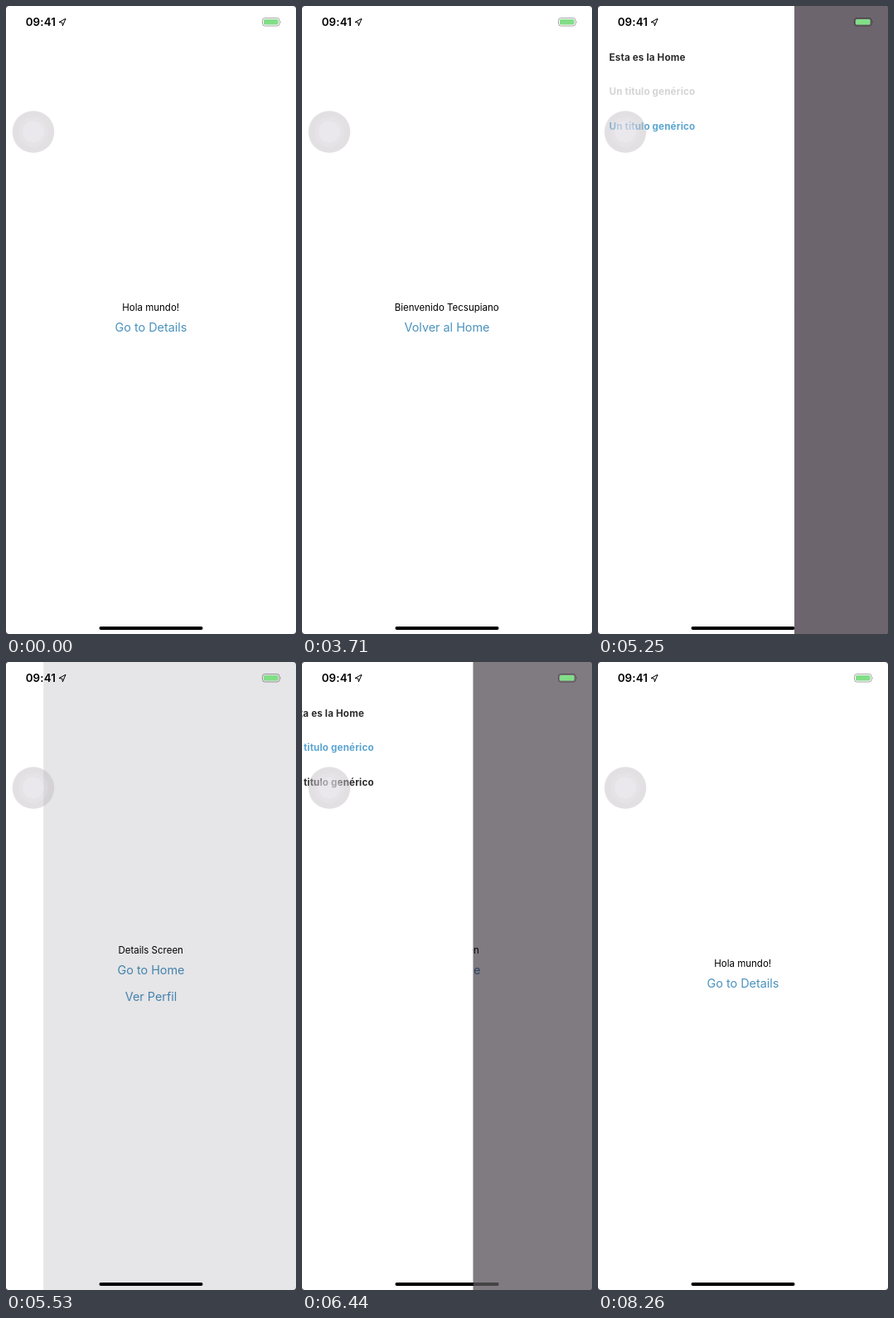
Animation of 350 by 756 pixels, one loop 8.33 s. Source, as an HTML page:

```html
<!DOCTYPE html>
<html lang="es">
<head>
<meta charset="utf-8">
<title>Drawer navigation</title>
<style>
  html, body { margin: 0; width: 100%; height: 100%; overflow: hidden; background: #444; }
  svg { display: block; width: 350px; height: 756px; background: #fff; border-radius: 4px; }
  text { font-family: Inter, "Liberation Sans", sans-serif; }
  .screen text { text-anchor: middle; font-size: 11.5px; }
  .screen .link { font-size: 14.4px; fill: #4a92be; }
  #drawer text { font-size: 11.6px; font-weight: 700; letter-spacing: .18px; }
  .clock { font-size: 13.3px; font-weight: 600; letter-spacing: .15px; }
</style>
</head>
<body>
<svg viewBox="0 0 350 756">
  <g class="screen">
    <text x="174.7" y="367">Hola mundo!</text>
    <text class="link" x="175" y="391.6">Go to Details</text>
  </g>
  <g class="screen">
    <text x="174.7" y="351">Details Screen</text>
    <text class="link" x="175" y="375.6">Go to Home</text>
    <text class="link" x="175" y="407.6">Ver Perfil</text>
  </g>
  <g class="screen">
    <text x="174.7" y="367">Bienvenido Tecsupiano</text>
    <text class="link" x="175" y="391.6">Volver al Home</text>
  </g>

  <rect id="shade" width="350" height="756" fill="#120714"/>
  <g id="drawer">
    <rect width="237" height="756" fill="#fff"/>
    <text x="13.5" y="66">Esta es la Home</text>
    <text x="13.5" y="107.3">Un titulo genérico</text>
    <text x="13.5" y="148.7">Un titulo genérico</text>
  </g>

  <g id="floating-button">
    <circle cx="33" cy="151.5" r="25.3" fill="#bebac1" opacity=".45"/>
    <circle cx="33" cy="151.5" r="18" fill="#f4f0f8" opacity=".15"/>
    <circle cx="33" cy="151.5" r="13" fill="#f4f0f8" opacity=".3"/>
  </g>

  <text class="clock" x="23.7" y="24.2">09:41</text>
  <path d="M64 19.5 72 15.2 68.4 23.8 67.8 20Z" fill="none" stroke="#000" stroke-linejoin="round"/>
  <rect x="309.5" y="14.5" width="20.5" height="9.5" rx="2.8" fill="none" stroke="#000" stroke-opacity=".35"/>
  <rect x="311" y="16" width="17.5" height="6.5" rx="1.5" fill="#82de87"/>
  <path d="M331.2 17.7q1.4 1.6 0 3.2z" fill="#000" opacity=".4"/>
  <rect x="112.5" y="747" width="125" height="4" rx="2"/>
  <rect id="indicator-glow" y="747" height="4" rx="2" fill="#fff"/>
</svg>
<script>
const LOOP = 8330, DRAWER_WIDTH = 237, SPRING_RATE = 0.016, FADED = 0.2;
const INDICATOR_LEFT = 112.5, INDICATOR_RIGHT = 237.5;
const HOME = 0, DETAILS = 1, PROFILE = 2;

const routes = [[0, HOME], [1400, DETAILS], [2660, PROFILE], [5340, DETAILS], [7188, HOME]];
const drawerMoves = [[3980, 1], [5340, 0], [6218, 1], [7188, 0]];

const screens = [...document.querySelectorAll('.screen')];
const drawer = document.getElementById('drawer');
const shade = document.getElementById('shade');
const glow = document.getElementById('indicator-glow');
const items = [...drawer.querySelectorAll('text')];

const presses = [
  { el: screens[HOME].querySelector('.link'), down: 1250, up: 1400 },
  { el: screens[DETAILS].querySelectorAll('.link')[1], down: 2510, up: 2660 },
  { el: items[DETAILS], down: 5240, up: 5340 },
  { el: items[HOME], down: 7060, up: 7188 },
];

const latest = (events, t) => events.filter(([start]) => start <= t).pop();

// Critically damped spring from 0 to 1
const spring = ms => {
  const x = ms * SPRING_RATE;
  return 1 - (1 + x) * Math.exp(-x);
};

function drawerProgress(t) {
  const move = latest(drawerMoves, t);
  if (!move) return 0;
  const [start, target] = move, p = spring(t - start);
  const value = target ? p : 1 - p;
  return value < 0.004 ? 0 : value > 0.997 ? 1 : value;
}

function pressOpacity(t, { down, up }) {
  if (t < down) return 1;
  return t < up ? FADED : Math.min(1, FADED + (1 - FADED) * (t - up) / 250);
}

function render(t) {
  const route = latest(routes, t)[1], open = drawerProgress(t);
  const edge = open * DRAWER_WIDTH;
  screens.forEach((screen, i) => screen.style.display = i === route ? '' : 'none');
  items.forEach((item, i) => item.setAttribute('fill', i === route ? '#5ca5d0' : '#2c2c2e'));
  presses.forEach(press => press.el.setAttribute('opacity', pressOpacity(t, press)));
  drawer.setAttribute('transform', `translate(${edge - DRAWER_WIDTH})`);
  shade.setAttribute('opacity', 0.62 * open ** 1.1);

  // The home indicator lightens where it lies over the shade
  const glowLeft = Math.max(edge, INDICATOR_LEFT);
  glow.setAttribute('x', glowLeft);
  glow.setAttribute('width', INDICATOR_RIGHT - glowLeft);
  glow.setAttribute('opacity', 0.35 * open ** 2);
}

const began = performance.now();
function tick() {
  render((performance.now() - began) % LOOP);
  requestAnimationFrame(tick);
}
tick();
</script>
</body>
</html>
```
